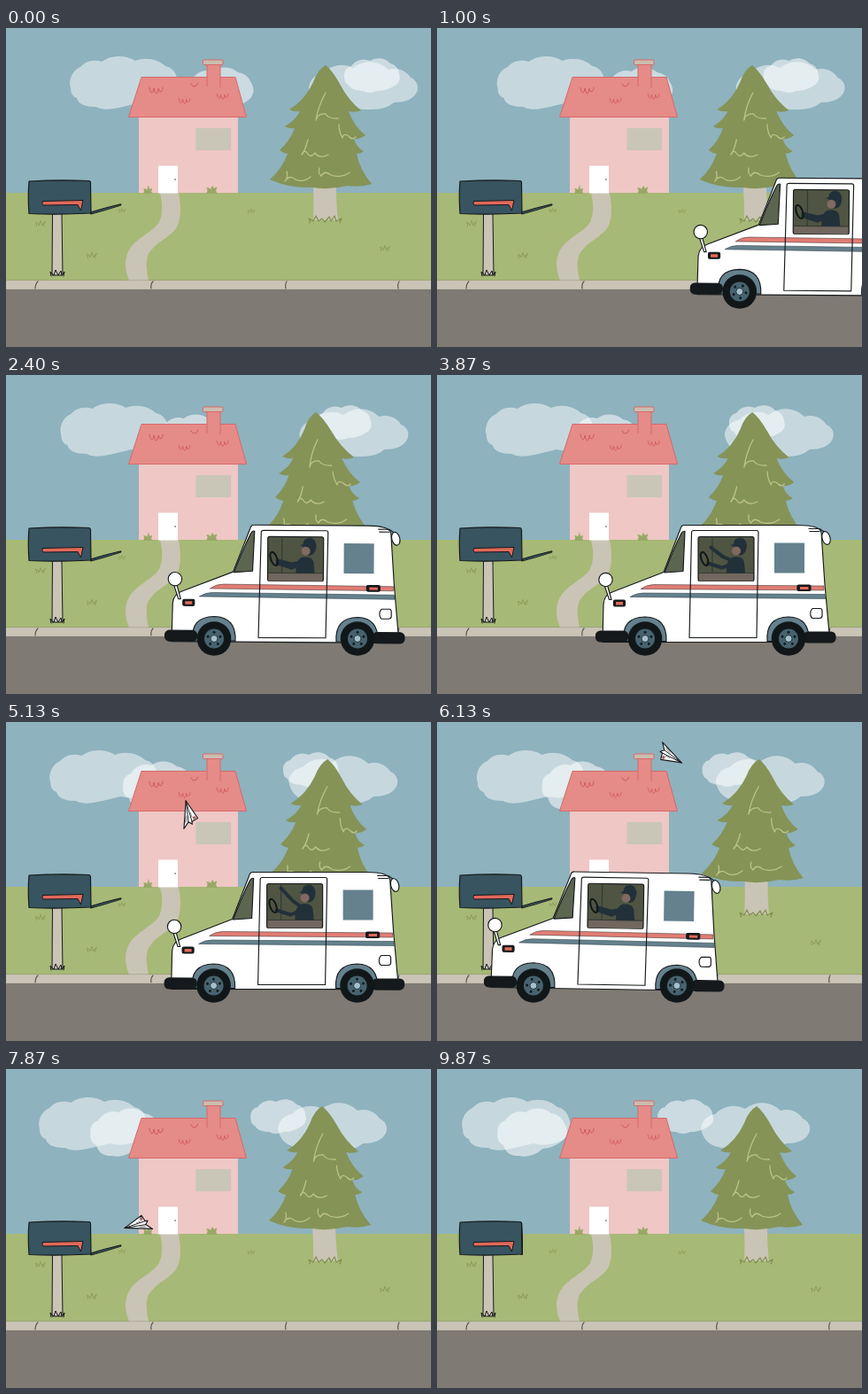
An HTML page for the animation above (9.94 s loop, 480 px wide and 360 px high).

```html
<!DOCTYPE html>
<html lang="en">
<head>
<meta charset="utf-8">
<title>Mail delivery</title>
<style>
html, body { margin: 0; width: 100%; height: 100%; overflow: hidden; background: #8eb2be; }
svg { display: block; width: 100vw; height: 100vh; }
.ink { stroke: #15191b; stroke-width: 1.15; stroke-linejoin: round; stroke-linecap: round; }
.line { fill: none; stroke-linecap: round; stroke-linejoin: round; }
</style>
</head>
<body>
<svg viewBox="0 0 480 360" xmlns="http://www.w3.org/2000/svg">
  <defs>
    <clipPath id="slot"><rect x="96" y="0" width="384" height="360"/></clipPath>
    <path id="tuft" class="line" d="M-5 3Q-5 0-6-2Q-3-1-2 2Q-1-2 0-4Q1-1 2 2Q3-1 6-3Q4 0 4 3"/>
    <path id="shingle" class="line" d="M-8-3Q-7 3-5 3Q-3 2-3-2Q-2 4 0 4Q2 3 2-2Q3 3 5 2Q7 1 7-3"/>
    <g id="wheel">
      <circle r="19.3" fill="#111719"/>
      <circle r="11" fill="#46636f"/>
      <circle r="4" fill="#a5bfc8" stroke="#20333c"/>
      <g class="bolts" fill="#15191b"></g>
    </g>
  </defs>

  <rect width="480" height="360" fill="#8eb2be"/>
  <g id="far" fill="#fff" fill-opacity=".5">
    <path d="M73 68A20 20 0 0 1 84 44A22 22 0 0 1 108 38A36 36 0 0 1 146 37A34 34 0 0 1 180 43A16 16 0 0 1 193 56A18 18 0 0 1 184 81Q168 88 152 84Q136 88 127 90Q110 94 102 89Q82 89 80 79Q73 77 73 68Z"/>
    <path d="M342 67A18 18 0 0 1 358 51A28 28 0 0 1 392 45A30 30 0 0 1 432 47A22 22 0 0 1 457 56A12 12 0 0 1 463 74Q457 84 438 84Q428 93 409 92Q393 92 387 86Q371 92 358 87Q345 83 342 67Z"/>
  </g>
  <g id="near" fill="#fff" fill-opacity=".54">
    <path d="M201 72A13 13 0 0 1 210 58A20 20 0 0 1 233 49A24 24 0 0 1 262 50A18 18 0 0 1 277 62A14 14 0 0 1 273 82Q264 89 252 90Q240 101 226 98Q211 99 208 86Q200 83 201 72Z"/>
    <path d="M382 54A10 10 0 0 1 390 43A17 17 0 0 1 411 37A18 18 0 0 1 434 40A12 12 0 0 1 444 52A10 10 0 0 1 439 65Q430 71 419 71Q410 75 403 71Q390 71 387 64Q382 62 382 54Z"/>
  </g>

  <rect y="186" width="480" height="100" fill="#a7b976"/>
  <path d="M174 186H195Q199 207 195 220C190 236 168 240 160 257Q157 267 161 285H139Q132 268 137 255C144 237 165 232 173 219Q179 206 174 186Z" fill="#c9c4b5"/>
  <rect y="285" width="480" height="10" fill="#cac4b7"/>
  <rect y="295" width="480" height="65" fill="#7f7a74"/>
  <path d="M0 284.7H480M0 295.2H480" stroke="#777566" stroke-width=".8" opacity=".4"/>
  <g class="line" stroke="#59564f" stroke-width="1.2">
    <path d="M36 286Q33 289 33 294M166 286Q163 289 164 294M317 286Q315 289 316 294M444 286Q442 289 443 294"/>
  </g>
  <g id="tufts" stroke="#8a9a57" stroke-width="1"></g>

  <rect x="150" y="99" width="112" height="87" fill="#efc7c5"/>
  <g fill="#e58b88" stroke="#d66a69" stroke-width="1">
    <path d="M153 55.5H259L271.500 100.500H138.500Z"/>
    <path d="M227 66V41H242V67" />
    <rect x="222.500" y="36" width="22.500" height="5.500" rx="1" fill="#cbbdb0"/>
  </g>
  <g stroke="#d05b5b" stroke-width="1">
    <use href="#shingle" x="170" y="70"/>
    <use href="#shingle" transform="translate(202 82) scale(.85)"/>
    <use href="#shingle" transform="translate(245 77) scale(.85)"/>
    <path class="line" d="M209 63Q211 67 213 66Q215 66 217 62"/>
  </g>
  <rect x="214.500" y="113" width="39.500" height="25" fill="#c9c6b7"/>
  <rect x="172" y="155.500" width="22" height="31" fill="#fff"/>
  <circle cx="191" cy="171" r="1" fill="#8b8b86"/>
  <g fill="#99a965">
    <path d="M155 187Q157 183 155 181Q159 181 159 183L161 177L162 182Q165 180 165 182Q163 185 166 187Z"/>
    <path d="M226 187Q229 183 226 180Q230 180 231 182L233 178L235 181Q239 178 238 181Q236 184 239 187Z"/>
  </g>

  <g id="tree">
    <path d="M347 179H373Q373 200 375 217H347Q348 198 347 179Z" fill="#c9c4b5"/>
    <path d="M361 42Q368 47 377 63Q386 81 401 93Q394 96 387 94Q393 111 406 121Q400 126 393 125Q396 135 404 139Q400 142 396 142Q400 161 413 176Q401 180 386 178Q365 183 346 180Q320 181 298 171Q311 160 318 142Q313 141 309 138Q321 127 326 113Q319 114 315 111Q328 103 332 94Q326 95 320 92Q338 81 347 61Q352 47 361 42Z" fill="#859357"/>
    <g class="line" stroke="#bdc387" stroke-width="1.3">
      <path d="M361 73Q353 87 350 104Q352 96 361 97Q365 103 375 102"/>
      <path d="M376 109Q376 117 380 124Q381 118 387 122Q391 127 395 123"/>
      <path d="M341 126Q338 138 334 143Q337 136 341 142Q344 147 349 141Q354 148 364 143"/>
      <path d="M317 162Q319 169 315 173Q320 165 327 171Q335 175 344 168"/>
      <path d="M354 158Q352 163 356 167Q360 160 367 166Q378 170 388 163"/>
    </g>
  </g>
  <path class="line" d="M343 220Q344 217 342 215L347 218L350 212L353 218L357 215L360 219L365 213L367 218L371 212L373 218L379 215L377 220" stroke="#7f8f4d" stroke-width="1.2"/>

  <g class="ink">
    <path d="M52.500 209L52 279H64L63 209Z" fill="#c9c4b5" stroke-width="1"/>
    <path d="M51 280L50 275L54 279L56 273L59 279L62 274L63 279L66 275L65 280" fill="none" stroke-width="1"/>
    <path id="flap" d="M95.500 208Q113 207.500 131 208Q132 208.700 130 209.300Q113 210.300 95.500 210Z" fill="#375460" stroke-width="1"/>
    <path d="M26 173Q60 171 94 172.500Q96 173 95.500 177L96 209Q60 211 26 209.500Q24.500 190 26 173Z" fill="#375460"/>
    <path d="M42 195.500L87 194.500L84.500 206L81 199.500L42 200Q39.500 198 42 195.500Z" fill="#e2695a" stroke-width="1"/>
  </g>

  <g id="truck">
    <g id="body">
      <g class="ink" fill="#fff">
        <path d="M279 170H408Q432 170 434 178L438 237L443 292V302H187L188 259Q189 248 199 245L256 223L275 174Q276 170 279 170Z"/>
        <path d="M280 177L278 222L257 223.500Q267 197 276 179Q278 176 280 177Z" fill="#5b6550"/>
      </g>
      <path d="M230 242Q237 237 245 237L437 238.500V243.500Z" fill="#e07d74" stroke="#503d3c" stroke-width=".6"/>
      <path d="M218 251Q225 246.500 233 246.500L438 248L439 253Z" fill="#64818d" stroke="#33454d" stroke-width=".6"/>
      <path class="ink" d="M285 297L287.500 178Q287.500 176 290 176H361Q363 176 363 178L361 297Z" fill="none"/>
      <rect class="ink" x="295" y="183" width="63" height="50" rx="2" fill="#4f5542"/>
      <path d="M296 224H357V233H296Z" fill="#71675f"/>
      <path d="M311 184V224M296 224H357" stroke="#343b37" stroke-width="1.2"/>
      <g fill="#22303a">
        <path d="M327 224Q326 209 334 206Q345 204 347 212L348 224Z"/>
        <ellipse cx="342" cy="195" rx="7.500" ry="9"/>
        <ellipse cx="338" cy="199" rx="5" ry="5" fill="#806962"/>
        <path d="M331 193L335 191Q335 184 343 184Q350 185 350 195Z"/>
        <path class="line" d="M334 213L322 218L306 213" stroke="#22303a" stroke-width="4"/>
        <path id="arm" class="line" stroke="#22303a" stroke-width="4"/>
      </g>
      <ellipse cx="302" cy="208" rx="3.500" ry="8" fill="none" stroke="#111719" stroke-width="2" transform="rotate(-20 302 208)"/>
      <rect x="381" y="190" width="34" height="34" fill="#64818d"/>
      <g class="ink">
        <path d="M420 174H432L438 178M421 177H432" fill="none"/>
        <ellipse cx="439.500" cy="184.500" rx="4.500" ry="7.500" transform="rotate(-15 439.500 184.500)" fill="#fff"/>
        <path d="M189.500 239L194.500 254H197L192.500 238Z" fill="#fff"/>
        <circle cx="190.500" cy="231.500" r="7.700" fill="#fff"/>
        <rect x="199.500" y="254.500" width="13" height="7" rx="1.500" fill="#15191b"/>
        <rect x="407" y="237.500" width="15" height="6.500" rx="1.500" fill="#15191b"/>
        <path d="M424 264H433Q435 264 435 267V272Q435 275 432 275H424Q421 273 422 267Z" fill="#fff"/>
        <path d="M211 301Q208 274 235 273.500Q260 274 259 301Z" fill="#64818d"/>
        <path d="M373 301Q371 274 397 273.500Q421 274 420 301Z" fill="#64818d"/>
        <rect x="179.500" y="289.500" width="36" height="12" rx="5" fill="#15191b"/>
        <rect x="414" y="290.500" width="36" height="12" rx="5" fill="#15191b"/>
      </g>
      <path d="M202 256.500H210V260H202ZM410 239.500H419.500V242.500H410Z" fill="#e2695a"/>
    </g>
    <use href="#wheel" x="235" y="297.500"/>
    <use href="#wheel" x="397" y="297.500"/>
  </g>

  <g clip-path="url(#slot)">
    <g id="plane">
      <path class="ink" d="M15 0L-16 -6L-9 0L-12 4L-9 4L-6 11Z" fill="#fff"/>
      <path class="line" d="M15 0L-9 0M15 0L-9 4" stroke="#15191b" stroke-width=".9"/>
      <path class="line" d="M-8-2L-2-1.500M-9-3.500L-3-2.700M-4 4.500L1 3.500" stroke="#70777a" stroke-width=".8"/>
      <rect x="-6.500" y="5.500" width="3" height="3.500" fill="#a9645d"/>
    </g>
  </g>
</svg>
<script>
const LOOP = 9940;
const $ = id => document.getElementById(id);
const clamp = v => Math.max(0, Math.min(1, v));
const ease = (t, a, b) => { const u = clamp((t - a) / (b - a)); return u * u * (3 - 2 * u); };
const hump = (t, a, b) => Math.sin(Math.PI * clamp((t - a) / (b - a))) ** 2;
const put = (id, transform) => $(id).setAttribute('transform', transform);
const show = (id, on) => { $(id).style.display = on ? '' : 'none'; };

$('tufts').innerHTML = [[39, 221], [131, 206], [97, 257], [277, 207], [428, 249]]
  .map(([x, y], i) => `<use href="#tuft" transform="translate(${x} ${y}) scale(${i % 2 ? .65 : .9})"/>`).join('');

const bolts = document.querySelector('.bolts');
bolts.innerHTML = Array.from({ length: 5 }, (_, i) =>
  `<circle cy="-7.3" r="1.5" transform="rotate(${i * 72})"/>`).join('');

// Flight waypoints: seconds, x, y
const flight = [
  [4.1, 310, 190], [4.35, 268, 178], [4.7, 224, 147], [5.13, 205, 104],
  [5.55, 213, 57], [5.83, 236, 34], [6.13, 264, 37], [6.6, 299, 80],
  [7, 280, 132], [7.4, 225, 166], [7.87, 149, 177], [8.2, 100, 186], [8.45, 62, 194]
];

function slope(i, k) {
  const a = flight[Math.max(0, i - 1)], b = flight[Math.min(flight.length - 1, i + 1)];
  return (b[k] - a[k]) / (b[0] - a[0]);
}

function flightAt(t) {
  let i = 0;
  while (i < flight.length - 2 && t > flight[i + 1][0]) i++;
  const a = flight[i], b = flight[i + 1], h = b[0] - a[0], u = (t - a[0]) / h;
  const axis = k => {
    const p = a[k], q = b[k], m = slope(i, k) * h, n = slope(i + 1, k) * h;
    const c2 = 3 * (q - p) - 2 * m - n, c3 = 2 * (p - q) + m + n;
    return [p + u * (m + u * (c2 + u * c3)), m + u * (2 * c2 + 3 * u * c3)];
  };
  const [x, dx] = axis(1), [y, dy] = axis(2);
  return [x, y, Math.atan2(dy, dx) * 180 / Math.PI];
}

function draw(ms) {
  const t = ms / 1000;
  put('far', `translate(${-4.45 * t} 0)`);
  put('near', `translate(${-13.45 * t} 0)`);

  // Treetop offset in pixels, sheared about the foot of the trunk
  const sway = -11 * ease(t, 0, 2.1) + 14 * ease(t, 2.4, 5.6) - 7 * ease(t, 5.9, 7.9) + 4 * ease(t, 7.9, 9.9);
  put('tree', `matrix(1 0 ${-sway / 176} 1 ${sway * 218 / 176} 0)`);

  // Brakes to a stop, then pulls away with constant acceleration
  const x = 113 * Math.max(0, 1.973 - t) ** 2 - 112 * Math.max(0, t - 5.07) ** 2;
  put('truck', `translate(${x} 0)`);
  show('truck', x < 303 && x > -452);
  bolts.setAttribute('transform', `rotate(${x / 19.3 * 180 / Math.PI})`);

  // The body rocks on its wheels
  const tilt = .4 * (1 - ease(t, 1.7, 2.2)) + .6 * hump(t, 2.2, 2.9)
    + .6 * hump(t, 4.1, 4.9) + .9 * ease(t, 5.07, 5.7);
  put('body', `translate(0 -.5) rotate(${tilt} 315 298)`);

  const lift = ease(t, 3.5, 4.1) - ease(t, 5.3, 5.8);
  $('arm').setAttribute('d', `M336 211L${322 + lift * 2} ${214 - lift * 12}L${306 + lift * 5} ${210 - lift * 22}`);

  const flying = t >= flight[0][0] && t < flight[flight.length - 1][0];
  show('plane', flying);
  if (flying) {
    const [px, py, angle] = flightAt(t);
    put('plane', `translate(${px} ${py}) rotate(${angle})`);
  }

  put('flap', `rotate(${-15 - 75 * ease(t, 8.5, 9)} 95.5 209)`);
}

function tick() {
  draw(performance.now() % LOOP);
  requestAnimationFrame(tick);
}
tick();
</script>
</body>
</html>
```
